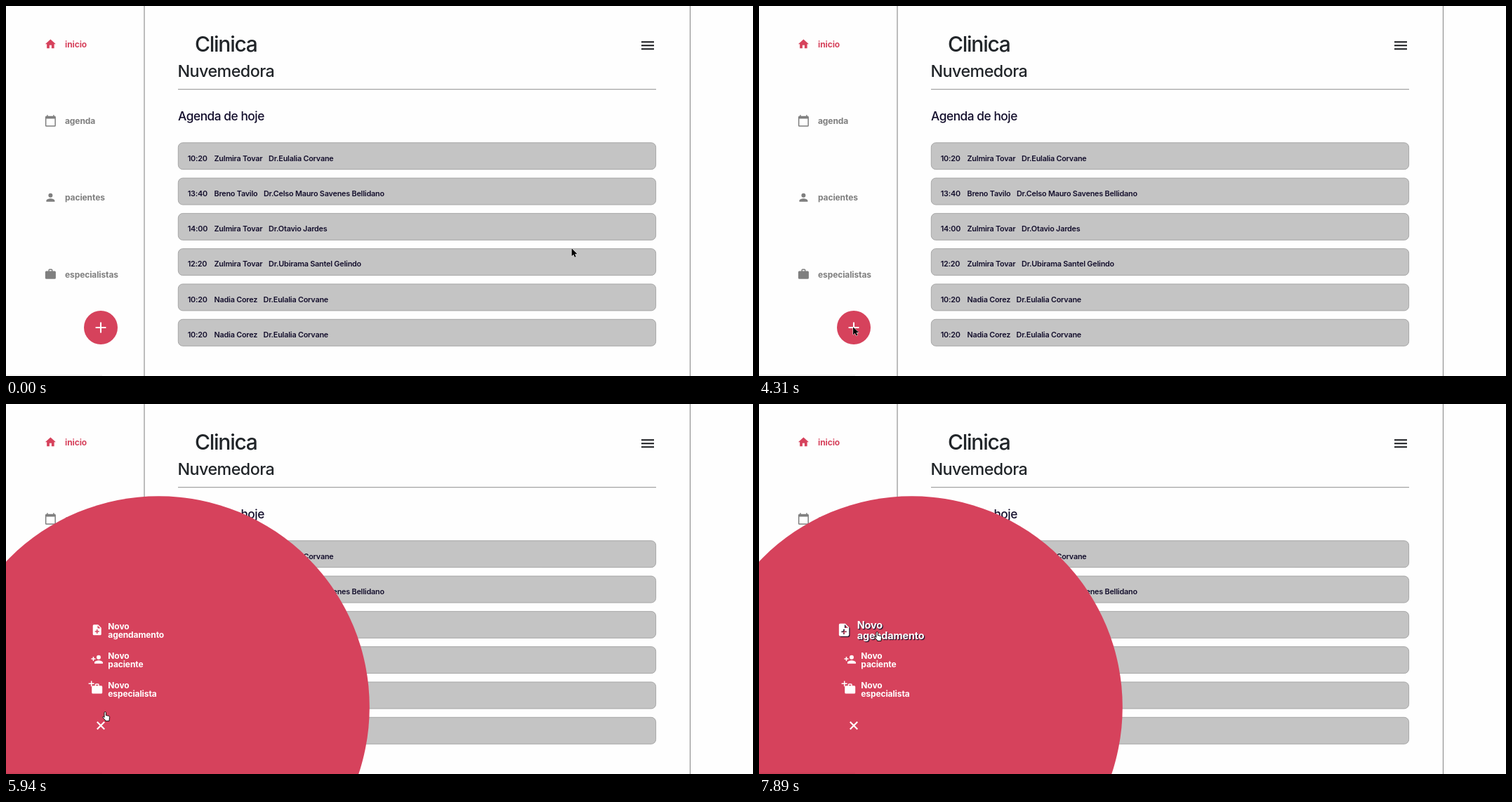
An HTML page that plays this animation: 1064 by 527 pixels, repeating every 8 s.

```html
<!DOCTYPE html>
<html lang="pt">
<head>
<meta charset="utf-8">
<title>Agenda</title>
<style>
  html, body { margin: 0; width: 100%; height: 100%; overflow: hidden; background: #fefefe; }
  svg { display: block; width: 1064px; height: 527px; font-family: Inter, "Liberation Sans", sans-serif; }
  .nav, .item { font-size: 12px; font-weight: 700; letter-spacing: -.1px; }
  .nav { fill: #7f7f7f; }
  .nav.on { fill: #d6425c; }
  .item { fill: #fff; }
  .title { fill: #212529; font-weight: 550; }
  .row { fill: #120d2b; font-size: 10.8px; font-weight: 600; letter-spacing: -.2px; }
</style>
</head>
<body>
<svg viewBox="0 0 1064 527">
  <rect width="1064" height="527" fill="#fefefe"/>
  <path d="M197 0V527M974.5 0V527" stroke="#929292" stroke-width="1.2"/>
  <path d="M245 118.6H926" stroke="#a3a3a3" stroke-width="1.4"/>
  <g class="title">
    <text x="269" y="65" font-size="30" letter-spacing="-1.25">Clinica</text>
    <text x="244.5" y="100.5" font-size="23.3" letter-spacing="-.55">Nuvemedora</text>
    <text x="245" y="163" font-size="17.3" letter-spacing="-.45" fill="#120d2b">Agenda de hoje</text>
  </g>
  <path d="M905 51.2h18M905 56.2h18M905 61.2h18" stroke="#17191c" stroke-width="2"/>
  <g id="nav"></g>
  <g id="rows"></g>
  <circle cx="135" cy="458" r="24" fill="#d6425c"/>
  <circle id="bubble" fill="#d6425c"/>
  <g id="menu"></g>
  <path id="plus" d="M127.6 458h14.8M135 450.6v14.8" stroke="#fff" stroke-width="2.1"/>
  <rect y="525" width="137" height="2" fill="#000" opacity=".04"/>
  <path id="arrow" d="M0 0V11l2.6-2.4 1.7 3.8 1.9-.8-1.7-3.7H8z" fill="#000" stroke="#fff" stroke-width="1" paint-order="stroke"/>
  <path id="hand" d="M3 8V1.2a1.2 1.2 0 0 1 2.4 0V5l4 .9q1.4.4 1.2 2L10 11.5V13H4.4v-1.2L.8 8.2q-.6-1.4.9-1.3z" fill="#fff" stroke="#000" stroke-width=".9"/>
</svg>
<script>
const LOOP = 8000;
const FIRST_TICK = 581;
const TICK = 148.6;
const OPEN = 5187;
const $ = id => document.getElementById(id);
const set = (id, attrs) => {
  for (const key in attrs) $(id).setAttribute(key, attrs[key]);
};
const clamp = v => Math.min(1, Math.max(0, v));
const ease = p => 1 - (1 - clamp(p) ** 1.15) ** 2.5;

const briefcase = 'M20 6h-4V4q0-2-2-2h-4q-2 0-2 2v2H4q-2 0-2 2v11q0 2 2 2h16q2 0 2-2V8q0-2-2-2zm-6 0h-4V4h4z';
const bust = x => `M${x} 12a4 4 0 1 0 0-8a4 4 0 0 0 0 8zm0 2c-2.7 0-8 1.3-8 4v2h16v-2c0-2.7-5.3-4-8-4z`;
const icons = {
  home: 'M10 20v-6h4v6h5v-8h3L12 3 2 12h3v8z',
  calendar: 'M20 3h-1V1h-2v2H7V1H5v2H4q-2 0-2 2v16q0 2 2 2h16q2 0 2-2V5q0-2-2-2zm0 18H4V8h16z',
  person: bust(12),
  work: briefcase,
  noteAdd: 'M14 2H6q-2 0-2 2v16q0 2 2 2h12q2 0 2-2V8zm2 14h-3v3h-2v-3H8v-2h3v-3h2v3h3zm-3-7V3.5L18.5 9z',
  personAdd: bust(15) + 'M6 10V7H4v3H1v2h3v3h2v-3h3v-2z',
  workAdd: briefcase + 'M.3-3.2V1h-4.4v2H.3v4.2h2V3h4.2V1H2.3v-4.2z'
};
const icon = (name, x, y) =>
  `<path transform="translate(${x} ${y}) scale(.75)" d="${icons[name]}"/>`;

const nav = { inicio: 'home', agenda: 'calendar', pacientes: 'person', especialistas: 'work' };
$('nav').innerHTML = Object.entries(nav).map(([label, name], i) => {
  const y = 54.3 + 109.2 * i;
  return `<g class="nav${i ? '' : ' on'}">${icon(name, 54.4, y - 9)}<text x="84" y="${y + 4.6}">${label}</text></g>`;
}).join('');

const rows = [
  ['10:20', 'Zulmira Tovar', 'Dr.Eulalia Corvane'],
  ['13:40', 'Breno Tavilo', 'Dr.Celso Mauro Savenes Bellidano'],
  ['14:00', 'Zulmira Tovar', 'Dr.Otavio Jardes'],
  ['12:20', 'Zulmira Tovar', 'Dr.Ubirama Santel Gelindo'],
  ['10:20', 'Nadia Corez', 'Dr.Eulalia Corvane'],
  ['10:20', 'Nadia Corez', 'Dr.Eulalia Corvane']
];
$('rows').innerHTML = rows.map(([time, patient, doctor], i) => {
  const y = 194.8 + 50.3 * i;
  return `<rect x="245.3" y="${y}" width="680.3" height="37.9" rx="6.5" fill="#c4c4c4" stroke="#a6a6a6"/>
    <text class="row" y="${y + 25.7}"><tspan x="258.7">${time}</tspan><tspan x="296.5">${patient}</tspan><tspan dx="8.5">${doctor}</tspan></text>`;
}).join('');

// hover intervals in ms
const items = [
  { word: 'agendamento', name: 'noteAdd', from: 7435, to: Infinity },
  { word: 'paciente', name: 'personAdd', from: 6622, to: 7385 },
  { word: 'especialista', name: 'workAdd', from: 6045, to: 6622 }
];
const itemY = i => 322.5 + 42 * i;
$('menu').innerHTML = items.map(({ word, name }, i) =>
  `<g class="item" id="item${i}">${icon(name, 120.7, itemY(i) - 9.7)}
    <text x="145.3" y="${itemY(i) - 1.9}">Novo</text><text x="145.3" y="${itemY(i) + 10.1}">${word}</text></g>`
).join('');

// pointer route: time, x, y
const route = [
  [440, 805.7, 345.3], [1030, 290, 488], [1325, 118, 458], [1472, 138.5, 438],
  [1920, 112.5, 311.5], [2810, 137, 464], [3110, 139.5, 468], [3400, 137, 464],
  [4150, 137, 464], [4300, 134, 457], [4440, 135, 461], [5640, 135, 461],
  [6820, 159.5, 369.5], [7120, 159.5, 369.5], [7590, 167.5, 331], [7860, 168, 324.5]
];

function pointerAt(t) {
  const next = route.findIndex(([time]) => time > t);
  if (next === 0) return route[0].slice(1);
  if (next < 0) return route.at(-1).slice(1);
  const [a, b] = [route[next - 1], route[next]];
  const p = (t - a[0]) / (b[0] - a[0]);
  return [1, 2].map(axis => a[axis] + (b[axis] - a[axis]) * p);
}

function drawBubble(t) {
  // grows along a diagonal, overshoots, then settles
  const grow = clamp((t - OPEN) / TICK);
  const settle = clamp((t - OPEN) / TICK - 1);
  const shift = 65 * grow - 24 * settle;
  set('bubble', { cx: 176.5 + shift, cy: 472.5 - shift, r: t < OPEN ? 0 : 20 + 280.3 * grow });
  set('plus', { transform: `rotate(${45 * grow} 135 458)` });
}

function drawMenu(t) {
  set('menu', { opacity: clamp((t - OPEN) / 270) });
  items.forEach(({ from, to }, i) => {
    const hover = ease((t - from) / 400) - ease((t - to) / 400);
    const y = itemY(i);
    set('item' + i, { transform: `translate(173 ${y}) scale(${1 + .2 * hover}) translate(-173 ${-y})` });
    $('item' + i).style.filter = hover > .01
      ? `drop-shadow(1.6px 1.6px 0 rgba(24,18,44,${hover}))` : 'none';
  });
}

function drawPointer(t) {
  const [x, y] = pointerAt(t);
  const pointing = t >= 4440;
  set('arrow', { transform: `translate(${x} ${y})`, opacity: pointing ? 0 : 1 });
  set('hand', { transform: `translate(${x - 4} ${y})`, opacity: pointing ? 1 : 0 });
}

function render(now) {
  const t = now < FIRST_TICK ? 0 : FIRST_TICK + TICK * Math.floor((now - FIRST_TICK) / TICK);
  drawBubble(t);
  drawMenu(t);
  drawPointer(t);
}

const start = performance.now();
function loop() {
  render((performance.now() - start) % LOOP);
  requestAnimationFrame(loop);
}
loop();
</script>
</body>
</html>
```
